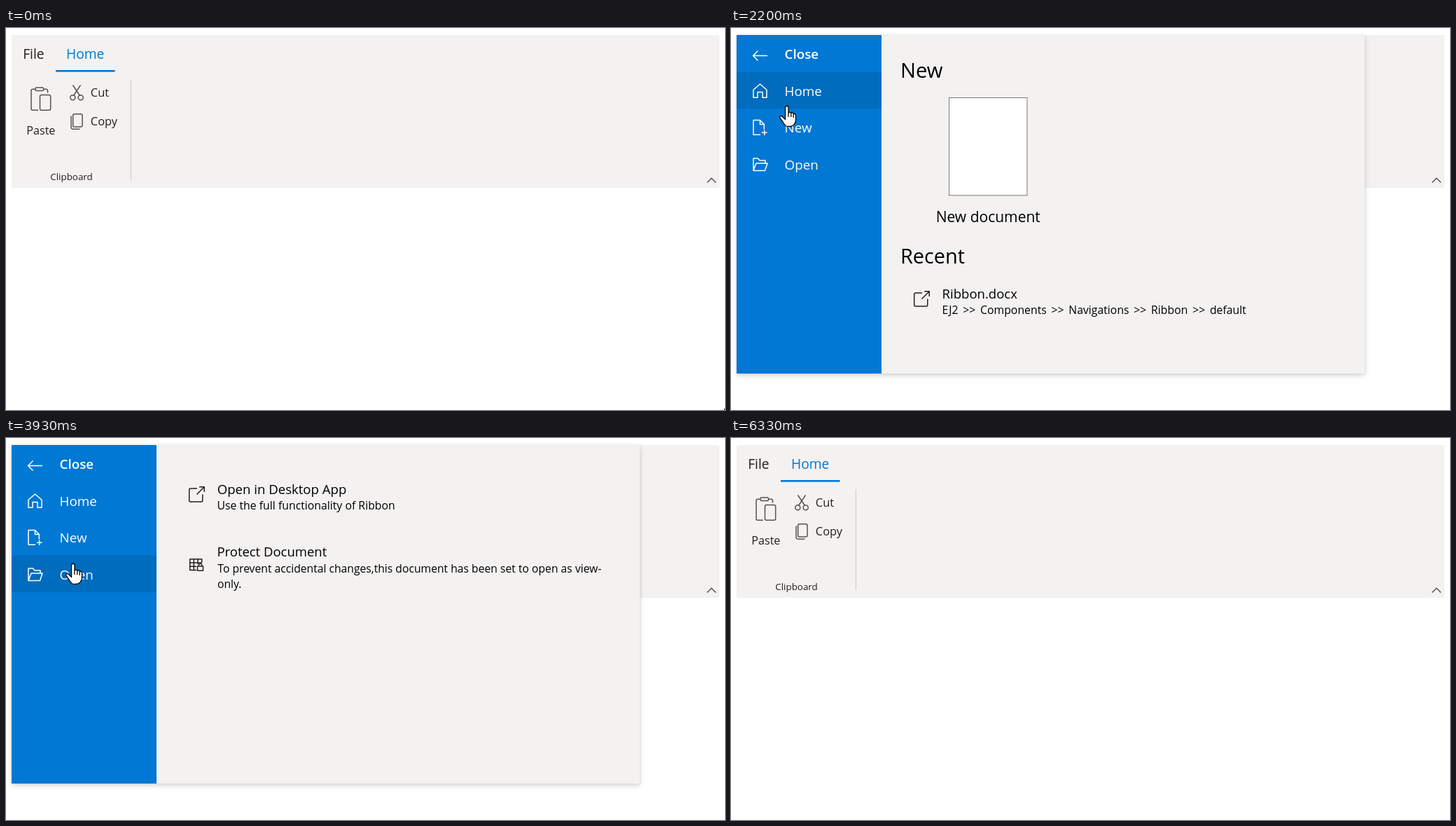
An HTML page for the animation above (7070 ms loop, 1027 by 545 pixels).

```html
<!DOCTYPE html>
<html lang="en">
<head>
<meta charset="utf-8">
<title>Ribbon file menu</title>
<style>
html, body { margin: 0; width: 100%; height: 100%; overflow: hidden; background: #fff; }
svg { display: block; width: 100vw; height: 100vh; font-family: "Open Sans", "Noto Sans", sans-serif; }
.icon { fill: none; stroke-width: 1.5; stroke-linejoin: round; }
#backstage { filter: drop-shadow(0 3px 3.5px rgba(0, 0, 0, .15)) drop-shadow(0 .5px 1px rgba(0, 0, 0, .12)); }
</style>
</head>
<body>
<svg id="stage" viewBox="0 0 1027 545"></svg>
<script>
const LOOP = 7070, TICK = 1000 / 15;
const BLUE = '#0078d4', HOVER = '#006cbe', SELECTED = '#005a9e', PRESSED = '#006aba';
const GRAY = '#55524f', INK = '#201f1e';
const ROW_TOP = 10.5, ROW_H = 52.4;

const text = (x, y, size, str, attrs = '') =>
  `<text x="${x}" y="${y}" font-size="${size}" ${attrs}>${str.replace(/>/g, '&gt;')}</text>`;
const rect = (x, y, w, h, fill, attrs = '') =>
  `<rect x="${x}" y="${y}" width="${w}" height="${h}" fill="${fill}" ${attrs}/>`;
const icon = (d, color) => `<path class="icon" d="${d}" stroke="${color}"/>`;
const group = (id, ...parts) => `<g id="${id}">${parts.join('')}</g>`;

const ribbon = group('ribbon',
  rect(8, 10, 1011, 218, '#f3f2f1'),
  text(24.2, 44, 19.2, 'File', `id="fileTab" fill="${INK}"`),
  text(86, 44, 19.2, 'Home', `id="homeTab" fill="${BLUE}"`),
  rect(71, 60, 84.5, 2.6, BLUE),
  icon('M46 117.3H38.2Q36 117.3 36 115V89.5Q36 87.3 38.2 87.3H41.5M53.5 87.3H57.3Q59.5 87.3 59.5 89.5V92.5M43.5 85H52Q53.5 85 53.5 86.5V88Q53.5 89.5 52 89.5H43.5Q42 89.5 42 88V86.5Q42 85 43.5 85Z', GRAY),
  icon('M50.5 95.5H61.5Q63.7 95.5 63.7 97.7V115Q63.7 117.3 61.5 117.3H50.5Q48.5 117.3 48.5 115V97.7Q48.5 95.5 50.5 95.5Z', GRAY),
  icon('M95.5 81.5L105.5 96.5M106.5 81.5L96.5 96.5', GRAY),
  ...[95.3, 106.7].map(x => `<circle class="icon" cx="${x}" cy="99.3" r="3.5" stroke="${GRAY}"/>`),
  icon('M97.5 122.7H107Q109 122.7 109 124.7V139Q109 141 107 141H97.5Q95.7 141 95.7 139V124.7Q95.7 122.7 97.5 122.7ZM93 125.5V141Q93 144.3 96.3 144.3H105.5', GRAY),
  `<g fill="${INK}">`,
  text(49.8, 152, 16.2, 'Paste', 'text-anchor="middle"'),
  text(120.8, 98, 16.4, 'Cut'),
  text(120.8, 139, 16.4, 'Copy'),
  text(93.5, 217, 13.4, 'Clipboard', 'text-anchor="middle"'),
  '</g>',
  rect(178, 73.5, 1, 143.5, '#c8c6c4'),
  icon('M1001.5 220.5L1007.7 214.3L1014 220.5', GRAY));

const rowIcons = [
  'M52 39.5H31.5M38.5 32.5L31.5 39.5L38.5 46.5',
  'M32 88.2L41.5 80L51 88.2V99.3H45V91.5H38V99.3H32Z',
  'M42 152.3H32V131.5H41.5L47.3 137.5V144.5M41.5 131.5V137.5H47.3M47.7 145.5V153M44 149.3H51.5',
  'M32 203.5V186H38.5L41 189H49V193M32 203.5L36 193H52L48.5 203.5Z'
];
const menu = group('menu',
  rect(8, 10, 207, 483, BLUE),
  ...rowIcons.map((_, i) => rect(8, ROW_TOP + i * ROW_H, 207, ROW_H, BLUE, 'class="row"')),
  '<g fill="#fff">',
  ...['Close', 'Home', 'New', 'Open'].map((label, i) =>
    text(76.6, 44 + i * 52.5, 18.8, label, i ? '' : 'font-weight="600"')),
  '</g>',
  ...rowIcons.map(d => icon(d, '#fff')));

const launchIcon = y => `<g transform="translate(261 ${y})">` +
  icon('M12 3H2.5Q.7 3 .7 5V20Q.7 22 2.5 22H18Q19.8 22 19.8 20V11.5M11.5 11.5L22 1M15 .8H22.2V8', INK) + '</g>';

const newDoc = group('newDoc',
  text(242, 70.5, 29.2, 'New'),
  rect(311.5, 99.5, 111.5, 139.3, '#fff', 'stroke="#7a7876"'),
  text(367.2, 277, 21, 'New document', 'text-anchor="middle"'));

const recent = group('recent',
  text(242, 335.5, 28.9, 'Recent'),
  launchIcon(375),
  text(301.6, 385.7, 18.5, 'Ribbon.docx'),
  text(301.5, 407.8, 15.8, 'EJ2 >> Components >> Navigations >> Ribbon >> default', 'word-spacing="2.6"'));

const openPane = group('openPane',
  launchIcon(69),
  text(301.7, 80, 18.6, 'Open in Desktop App'),
  text(301.5, 102.3, 15.8, 'Use the full functionality of Ribbon'),
  icon('M272 188.5H262.7V172.7H279.7V178M262.7 178H279.7M262.7 183.3H272M268.3 172.7V188.5M274 172.7V180', INK),
  icon('M273.5 183H281.5V189.3H273.5ZM275.3 183V181.3Q275.3 179.3 277.5 179.3Q279.7 179.3 279.7 181.3V183', INK),
  text(301.4, 169, 18.5, 'Protect Document'),
  text(302.3, 191.5, 15.7, 'To prevent accidental changes,this document has been set to open as view-'),
  text(302, 213.5, 15.7, 'only.'));

const backstage = group('backstage', rect(8, 10, 897.5, 483, '#f3f2f1'), menu,
  '<g fill="#000">', newDoc, recent, openPane, '</g>');

const cursor = group('cursor',
  '<g fill="#fff" stroke="#000" stroke-width="1.3" stroke-linejoin="round" stroke-linecap="round">',
  '<path id="arrow" d="M.5 .5V21.5L5.2 17L8.7 24.5L11.8 23L8.5 15.7H15.3Z"/>',
  '<path id="hand" d="M-2.5 1.5C-2.5 -1.5 2 -1.5 2 1.5V10C2 7.5 5.5 7.5 5.8 10C6.5 8 9 8.5 9.2 11C10.5 9.5 12.5 10.5 12.5 13V19C12.5 24 9 28.5 3.5 28.5H1C-2.5 28.5 -4 25 -6 22L-10 16.5C-11.5 14 -8.5 12.5 -6.5 14.5L-2.5 18.5ZM2 10V14.5M5.8 10.5V14.5M9.2 11.5V15.5"/>',
  '</g>');

const $ = id => document.getElementById(id);
$('stage').innerHTML = ribbon + backstage + cursor;
const rows = [...document.querySelectorAll('.row')];
const show = (id, on) => $(id).setAttribute('display', on ? 'inline' : 'none');

const easeOut = u => 1 - (1 - u) ** 1.5;
const easeInOut = u => u * u * (3 - 2 * u);

// Pointer legs: start tick, end tick, target, easing.
const START = [1026, 543];
const legs = [
  [2, 13, [83, 61], easeInOut],
  [13, 17, [64, 46], easeOut],
  [29, 35, [84, 128], easeOut],
  [47, 52, [96, 180], easeOut],
  [64, 72, [98.5, 46], easeInOut],
  [90, 94, [2, 485], u => u ** 1.3]
];

function pointer(tick) {
  let pos = START;
  for (const [a, b, to, ease] of legs) {
    if (tick <= a) break;
    const k = ease(Math.min(1, (tick - a) / (b - a)));
    pos = pos.map((v, i) => v + (to[i] - v) * k);
  }
  return pos;
}

function draw(ms) {
  const tick = Math.floor((ms + 4) / TICK);
  const [x, y] = pointer(tick);
  const open = tick >= 24 && tick < 81;
  const page = tick < 42 ? 1 : tick < 59 ? 2 : 3;
  const onTabs = !open && y < 60 && x < 156;
  const hovered = open ? Math.floor((y - ROW_TOP) / ROW_H) : -1;

  $('fileTab').setAttribute('fill', onTabs && x < 71 ? BLUE : INK);
  $('homeTab').setAttribute('fill', onTabs && x >= 71 ? '#106ebe' : BLUE);

  show('backstage', open);
  show('newDoc', page < 3);
  show('recent', page === 1);
  show('openPane', page === 3);
  rows.forEach((row, i) => row.setAttribute('fill',
    i === hovered ? (i === 0 && tick >= 78 ? PRESSED : HOVER) : i === page ? SELECTED : BLUE));

  show('cursor', tick < 95);
  show('hand', open || onTabs);
  show('arrow', !open && !onTabs);
  $('cursor').setAttribute('transform', `translate(${Math.round(x)} ${Math.round(y)})`);
}

const begin = performance.now();
function frame() {
  draw((performance.now() - begin) % LOOP);
  requestAnimationFrame(frame);
}
draw(0);
requestAnimationFrame(frame);
</script>
</body>
</html>
```
